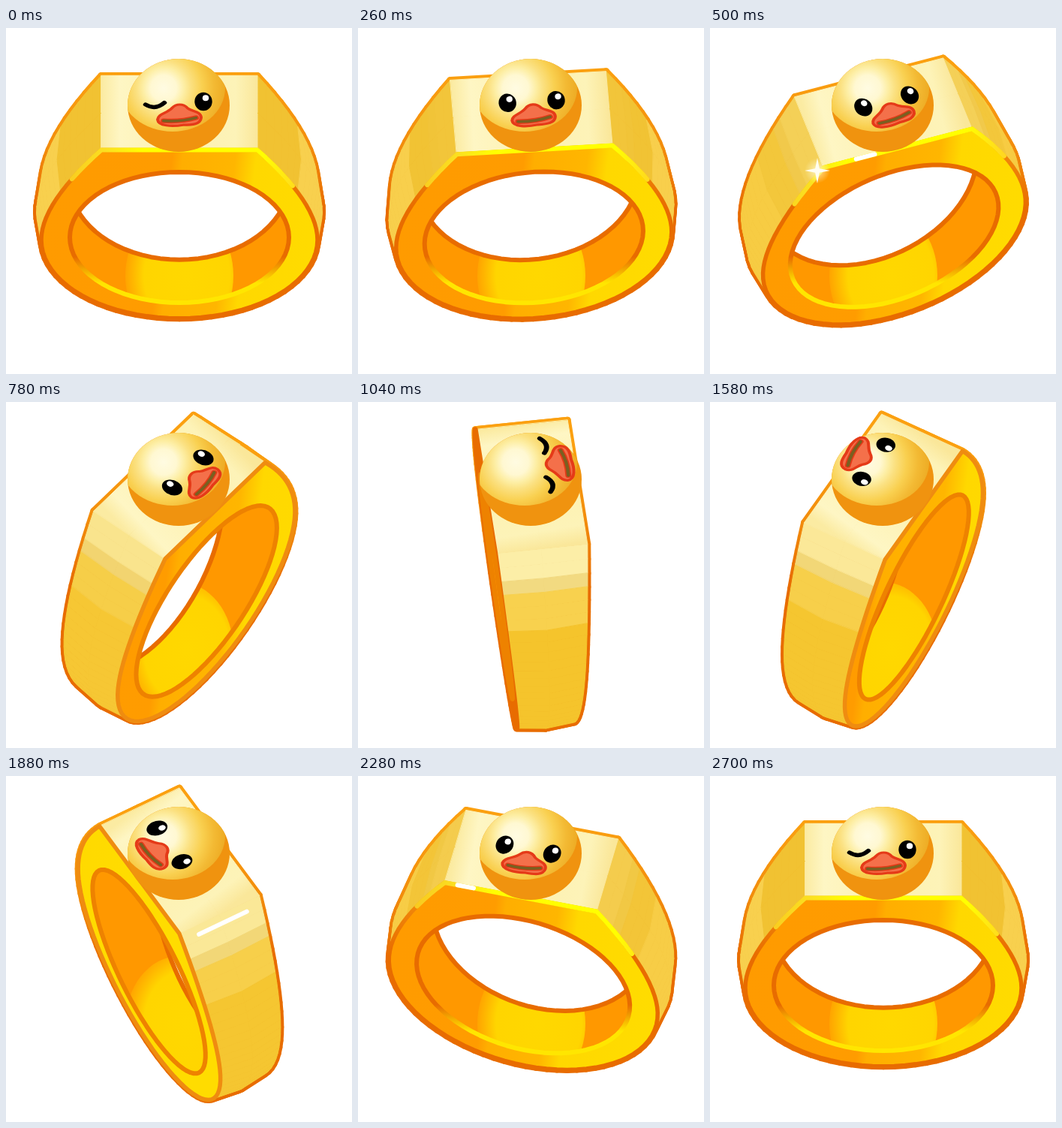
These frames come from a looping animation (461x461 px, 2.72 s). An HTML page with a canvas:

```html
<!DOCTYPE html>
<html>
<head>
<meta charset="utf-8">
<style>
html, body { margin: 0; width: 100%; height: 100%; overflow: hidden; background: #fff; }
canvas { display: block; width: 461px; height: 461px; }
</style>
</head>
<body>
<canvas id="stage" width="461" height="461"></canvas>
<script>
const ctx = document.getElementById('stage').getContext('2d');
const LOOP = 2720, CX = 231, CY = 113, TILT = 0.8, DROP = 0.6;
const RX = 184, MID = 220, RY = 192;
const DARK = '#e86c00';
let sin = 0, cos = 1;

// Ring cross-section as [x, depth below the plate], clockwise from the plate's right corner
const half = [];
for (let i = 0; i <= 14; i++) {
  const t = i / 14, u = 1 - t;
  half.push([104 * u * u + RX * (2 * u * t + t * t), 260 * u * t + MID * t * t]);
}
for (let i = 1; i <= 20; i++) {
  const a = i / 20 * Math.PI / 2;
  half.push([RX * Math.cos(a), MID + RY * Math.sin(a)]);
}
const outer = [...half, ...half.slice(0, -1).reverse().map(([x, d]) => [-x, d])];
const hole = Array.from({ length: 72 }, (_, i) => {
  const a = i / 36 * Math.PI;
  return [146 * Math.cos(a), 214 + 160 * Math.sin(a)];
});

const thick = d => 62 - 0.07 * d;
const project = (x, d, z) => [CX + x * cos + z * sin, CY + TILT * (z * cos - x * sin) + DROP * d];
const clamp = v => Math.max(0, Math.min(1, v));
const pulse = (t, center, width) => Math.max(0, 1 - Math.abs(t - center) / width);

// side: 1 front, 0 middle (slightly swollen), -1 back
function rim(points, side) {
  return points.map(([x, d]) => {
    const swell = 1 + 0.035 * (1 - side * side) * clamp(d / 120);
    return project(x * swell, d, side * thick(d));
  });
}

function trace(points, close = true) {
  points.forEach(([x, y], i) => i ? ctx.lineTo(x, y) : ctx.moveTo(x, y));
  if (close) ctx.closePath();
}
function path(points, close) {
  ctx.beginPath();
  trace(points, close);
}
function fill(color, rule) {
  ctx.fillStyle = color;
  ctx.fill(rule || 'nonzero');
}
function stroke(color, width) {
  ctx.strokeStyle = color;
  ctx.lineWidth = width;
  ctx.stroke();
}
function blend(gradient, stops) {
  stops.forEach(([at, color]) => gradient.addColorStop(at, color));
  return gradient;
}
const linear = (x0, y0, x1, y1, ...stops) => blend(ctx.createLinearGradient(x0, y0, x1, y1), stops);
const radial = (x, y, r, ...stops) => blend(ctx.createRadialGradient(x, y, 0, x, y, r), stops);
function ellipse(x, y, rx, ry) {
  ctx.beginPath();
  ctx.ellipse(x, y, rx, ry, 0, 0, 7);
}

// Side colour at a depth: gold seen from the edge, banded when turned to the viewer
function sideColor(d) {
  const flat = d < 100 ? [241, 194, 50] : [248, 208, 78];
  const facing = d < 28 ? [252, 238, 168] : d < 58 ? [242, 218, 130] : d < 105 ? [248, 209, 78] : [245, 196, 44];
  return `rgb(${flat.map((c, i) => Math.round(c + (facing[i] - c) * Math.abs(sin)))})`;
}

function drawBand(rims, outline) {
  const n = outer.length, quads = [];
  const plate = linear(...project(-104, 0, 0), ...project(104, 0, 0),
    [0, '#fbeba2'], [0.12, '#fef6c4'], [0.5, '#fdf1b0'], [0.86, '#fdf3b8'], [1, '#fae79a']);
  for (let k = 0; k < rims.length - 1; k++) {
    outer.forEach(([, d], i) => {
      const j = (i + 1) % n, near = rims[k], far = rims[k + 1];
      const color = i === n - 1 ? plate : sideColor((d + outer[j][1]) / 2);
      quads.push({ points: [near[i], near[j], far[j], far[i]], color });
    });
  }
  for (const { points } of quads) {
    path(points);
    stroke(outline, 9);
  }
  for (const { points, color } of quads) {
    const [a, b, , c] = points;
    if ((b[0] - a[0]) * (c[1] - a[1]) - (b[1] - a[1]) * (c[0] - a[0]) >= 0) continue;
    path(points);
    fill(color);
    stroke(color, 1);
  }
}

function drawInside(frontHole, backHole) {
  ctx.save();
  path(frontHole);
  ctx.clip();
  fill('#ff9800');
  ctx.save();
  ctx.translate(CX, 330);
  ctx.scale(1, 1.25);
  ellipse(0, 0, 72, 72);
  fill(radial(10, 0, 84, [0, '#ffd800'], [0.68, '#ffd500'], [0.85, '#ffb800'], [1, '#ffa000']));
  ctx.restore();
  path(backHole);
  fill('#fff');
  stroke(DARK, 6);
  ctx.restore();
}

function drawFace(front, frontHole, angle, outline) {
  const shift = angle < 0 ? -420 * Math.abs(Math.sin(2 * angle)) ** 3 : 0;
  const side = Math.abs(angle) * 180 / Math.PI;
  path(front);
  trace(frontHole);
  fill(linear(shift, 0, 461 + shift, 60,
    [0, '#ff9a00'], [0.52, '#ff9c00'], [0.55, '#ffae00'], [0.7, '#ffb600'], [0.76, '#ffd800'], [1, '#ffdc00']), 'evenodd');
  path(front);
  stroke(side > 65 ? DARK : side > 40 ? '#ef8c10' : outline, side > 65 ? 7 : 5.5);
  path(frontHole);
  stroke(side > 40 ? '#ee8200' : linear(0, 305, 0, 340, [0, DARK], [1, '#ffe600']), 6);

  // Bright bevel along the upper edge
  ctx.globalAlpha = 1 - clamp((side - 20) / 20);
  path([...front.slice(-5), ...front.slice(0, 6)], false);
  stroke(linear(70, 0, 390, 0, [0, '#f8c820'], [0.2, '#fbe020'], [0.35, '#ffff00'], [0.85, '#ffff00'], [1, '#ffd820']), 6);
  ctx.globalAlpha = 1;
}

function drawEye(u, closed) {
  ctx.save();
  ctx.translate(u, 15);
  if (closed) {
    ctx.beginPath();
    ctx.moveTo(-12, 5);
    ctx.quadraticCurveTo(1, 15, 13, 2);
    stroke('#000', 6.5);
  } else {
    ellipse(0, 0, 11.7, 13.8 + 1.5 * cos);
    fill('#000');
    ellipse(3, -6, 4.2, 5);
    fill('#fff');
  }
  ctx.restore();
}

function drawBeak() {
  ctx.translate(0, 39);
  ctx.beginPath();
  ctx.moveTo(-29, 6);
  ctx.bezierCurveTo(-28, -4, -17, -4, -10, -13);
  ctx.bezierCurveTo(-4, -21, 5, -21, 11, -13);
  ctx.bezierCurveTo(17, -7, 29, -8, 29, 3);
  ctx.bezierCurveTo(28, 14, 17, 15, 5, 15);
  ctx.bezierCurveTo(-10, 18, -28, 17, -29, 6);
  fill('#f4704a');
  stroke('#e53a18', 4);
  ctx.beginPath();
  ctx.moveTo(-21, 8);
  ctx.quadraticCurveTo(2, 10, 22, 3);
  stroke('#e53a18', 8);
  stroke('#7a5f20', 4.5);
}

function drawHead(t) {
  ctx.save();
  ellipse(230, 103, 68, 62);
  fill('#f0930f');
  ctx.clip();
  ellipse(222, 80, 70, 58);
  fill(radial(210, 80, 86, [0, '#fffbe2'], [0.2, '#fff8d2'], [0.32, '#fdeea4'],
    [0.42, '#fbe182'], [0.6, '#f9d050'], [0.78, '#f3ba34'], [1, '#eca820']));
  ctx.restore();

  const blink = pulse(t, 1040, 90) > 0;
  const wink = t < 160 || t > 2560;
  ctx.save();
  ctx.setTransform(cos, -TILT * sin, sin, TILT * cos, CX, 86);
  drawEye(-33, blink || wink);
  drawEye(32, blink);
  drawBeak();
  ctx.restore();
}

function drawStar(x, y, size) {
  if (size <= 0) return;
  const points = Array.from({ length: 8 }, (_, i) => {
    const a = i * Math.PI / 4, r = i % 2 ? size * 0.24 : size;
    return [x + r * Math.sin(a), y - r * Math.cos(a)];
  });
  ellipse(x, y, size, size);
  fill(radial(x, y, size, [0, '#fffbd0cc'], [1, '#fffbd000']));
  path(points);
  fill('#fffdf0');
}

function drawGlint(strength, from, to) {
  if (strength <= 0) return;
  ctx.globalAlpha = Math.min(1, strength * 2);
  path([project(...from), project(...to)], false);
  stroke('#fff', 6);
  ctx.globalAlpha = 1;
}

function draw(t) {
  const p = t / LOOP, power = 2.3;
  const ease = p < 0.5 ? (2 * p) ** power / 2 : 1 - (2 - 2 * p) ** power / 2;
  const heading = ease * 2 * Math.PI;
  // The ring looks the same after half a turn; the head does not
  const angle = heading - Math.PI * Math.round(heading / Math.PI);

  ctx.clearRect(0, 0, 461, 461);
  ctx.lineJoin = ctx.lineCap = 'round';
  sin = Math.sin(angle);
  cos = Math.cos(angle);

  const rims = [1, 0, -1].map(side => rim(outer, side));
  const frontHole = rim(hole, 1), backHole = rim(hole, -1);
  const outline = linear(0, 60, 0, 240, [0, '#fba010'], [0.55, '#f28c0c'], [1, DARK]);
  drawBand(rims, outline);
  drawInside(frontHole, backHole);
  drawFace(rims[0], frontHole, angle, outline);

  const early = -46 + (t - 500) * 0.6, late = -76 + (t - 2280) * 0.6;
  const sweep = 113 + (t - 1880) * 0.4;
  drawGlint(pulse(t, 500, 110), [early - 13, 0, 62], [early + 13, 0, 62]);
  drawGlint(pulse(t, 1880, 110), [sweep, 8, 37], [sweep, 8, -37]);
  drawGlint(pulse(t, 2280, 110), [late - 11, 0, 62], [late + 11, 0, 62]);
  drawStar(143, 190, 17 * pulse(t, 500, 180));
  drawStar(186, 315, 20 * pulse(t, 1320, 180));
  drawStar(412, 222, 8 * pulse(t, 1320, 140));

  sin = Math.sin(heading);
  cos = Math.cos(heading);
  drawHead(t);
}

function tick() {
  draw(performance.now() % LOOP);
  requestAnimationFrame(tick);
}
tick();
</script>
</body>
</html>
```
